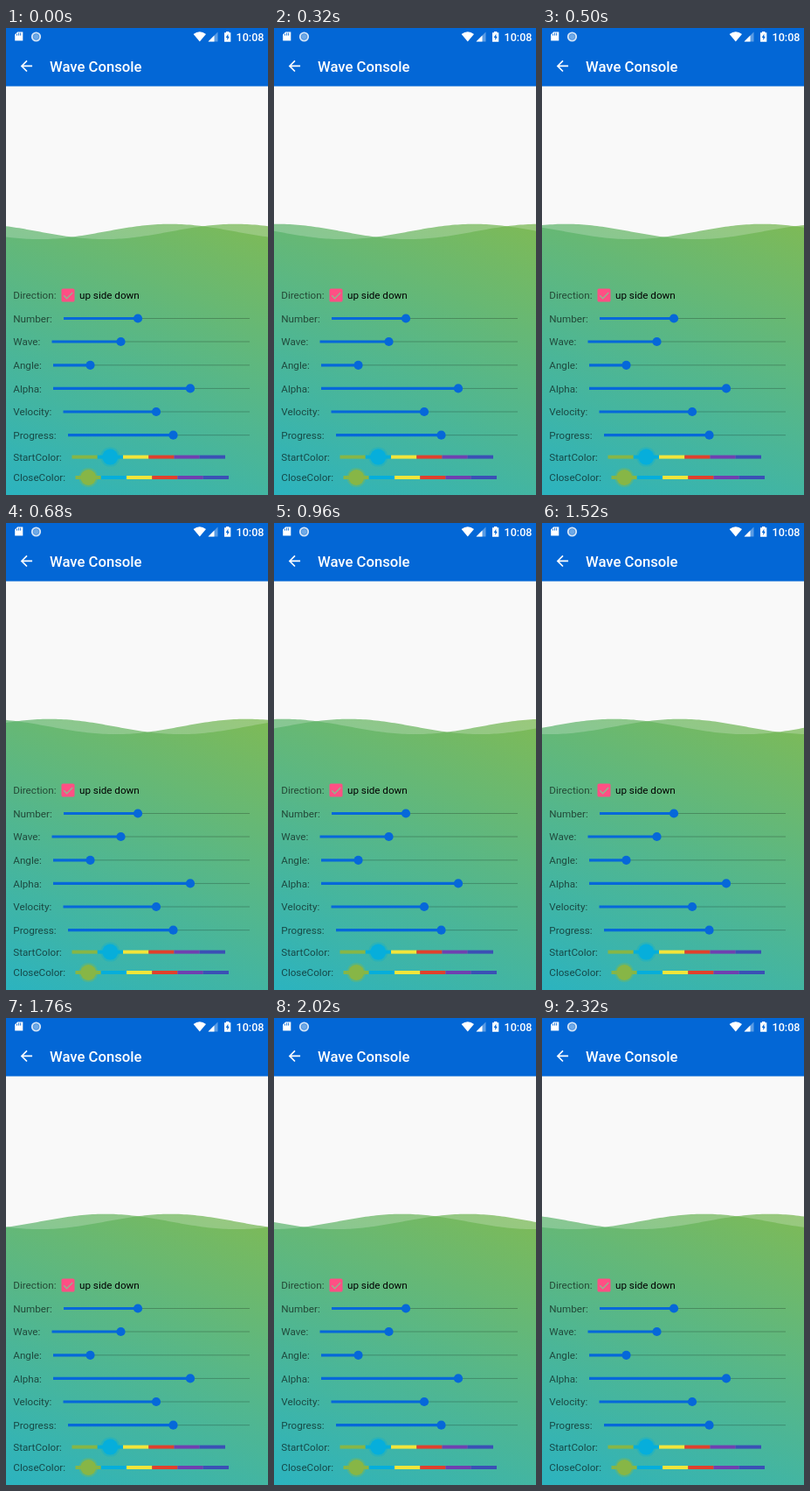
An HTML page that plays this animation: 300x533 px, repeating every 2340 ms.

```html
<!DOCTYPE html>
<html lang="en">
<head>
<meta charset="utf-8">
<title>Wave Console</title>
<style>
  html, body { margin: 0; width: 100%; height: 100%; overflow: hidden; background: #f9f9f9; }
  svg { display: block; width: 300px; height: 533px; }
  text { font: 11.67px Roboto, sans-serif; }
  .title { font-size: 16.67px; font-weight: 500; fill: #fff; }
  .clock { font-size: 12.6px; font-weight: 500; fill: #fff; }
  .label { fill: rgba(0, 0, 0, .6); }
</style>
</head>
<body>
<svg viewBox="0 0 300 533">
  <defs>
    <linearGradient id="water" gradientUnits="userSpaceOnUse" x1="69" y1="578" x2="231" y2="186">
      <stop offset="0" stop-color="#14acbe"/>
      <stop offset="1" stop-color="#74b444"/>
    </linearGradient>
  </defs>

  <g fill="url(#water)" fill-opacity=".7">
    <path class="wave"/>
    <path class="wave"/>
  </g>

  <rect width="300" height="66.5" fill="#0367d6"/>

  <!-- status bar -->
  <g fill="#fff">
    <path d="M13.2 4.5H19.3V14.6H10.2V7.5Z"/>
    <path d="M12.5 6.6v2M14.6 5.6v3M16.7 5.6v3" stroke="#0367d6" stroke-width=".9"/>
    <circle cx="34.5" cy="10" r="5.6" fill="#d5e5f7"/>
    <circle cx="34.5" cy="10" r="3.4" fill="#6fa9e6" stroke="#3f8bdc" stroke-width=".8"/>
    <path d="M214.6 7Q221.8 1.6 229 7L221.8 15.6Z"/>
    <path d="M242.5 4.5V15.5H231.5Z" opacity=".35"/>
    <path d="M238.5 8.5V15.5H231.5Z"/>
    <path d="M252 4H255.4V5.2H257.3V15.7H250V5.2H252Z"/>
    <path d="M254.3 6.8L251.7 10.9H253.3V14L255.8 9.8H254.3Z" fill="#0367d6"/>
  </g>
  <text class="clock" x="263.5" y="14.6">10:08</text>

  <!-- app bar -->
  <path transform="translate(13.4 33.4) scale(.833)" fill="#fff"
        d="M20 11H7.83l5.59-5.59L12 4l-8 8 8 8 1.41-1.41L7.83 13H20z"/>
  <text class="title" x="50" y="49.6">Wave Console</text>

  <!-- direction -->
  <text class="label" x="8.3" y="309.2">Direction:</text>
  <rect x="63.5" y="297.5" width="15" height="15" rx="1.6" fill="#ff4f84"/>
  <path d="M66.2 305.2l3.4 3.5 6.6-6.8" fill="none" stroke="#92b58e" stroke-width="1.5"/>
  <text x="84" y="309.2">up side down</text>

  <g id="controls"></g>
</svg>
<script>
const LOOP = 2340, STEP = 20, WIDTH = 300, LEVEL = 232.4, HEIGHT = 8.7;
const BLUE = '#0668d9';
const COLORS = ['#87b646', '#06aedb', '#f3e53a', '#e0402c', '#6f40b0', '#3b50b5'];

const line = (x1, x2, y, color, size) =>
  `<path d="M${x1} ${y}H${x2}" stroke="${color}" stroke-width="${size}"/>`;
const dot = (x, y, r, color, alpha = 1) =>
  `<circle cx="${x}" cy="${y}" r="${r}" fill="${color}" opacity="${alpha}"/>`;
const label = (name, y) => `<text class="label" x="8.3" y="${y + 4.2}">${name}:</text>`;

const slider = (name, y, start, thumb) =>
  label(name, y) +
  line(thumb, 279, y, 'rgba(0,0,0,.24)', 1) +
  line(start, thumb, y, BLUE, 3.2) +
  dot(thumb, y, 5.1, BLUE);

const palette = (name, y, start, thumb, pick) => {
  const size = 175.5 / COLORS.length;
  const bars = COLORS.map((c, i) => line(start + i * size, start + (i + 1) * size, y, c, 4));
  return label(name, y) + bars.join('') +
    dot(thumb, y, 11, COLORS[pick], .35) + dot(thumb, y, 9, COLORS[pick]);
};

document.getElementById('controls').innerHTML =
  slider('Number', 331.5, 66, 151) +
  slider('Wave', 358, 52.5, 131.5) +
  slider('Angle', 384.8, 54, 96.5) +
  slider('Alpha', 411.4, 54, 211) +
  slider('Velocity', 438, 65.5, 172) +
  slider('Progress', 464.7, 71, 191.5) +
  palette('StartColor', 489.6, 75.5, 119.3, 1) +
  palette('CloseColor', 513, 79.5, 94.3, 0);

const waves = document.querySelectorAll('.wave');

function wavePath(crest) {
  let d = 'M0 533';
  for (let x = 0; x <= WIDTH; x += 3) {
    const y = LEVEL - HEIGHT * Math.cos(2 * Math.PI * (x - crest) / WIDTH);
    d += `L${x} ${y.toFixed(2)}`;
  }
  return d + 'V533Z';
}

// Two equal waves a quarter period apart drift right, one screen per loop.
function draw() {
  const t = Math.floor(performance.now() % LOOP / STEP) * STEP;
  const crest = 188 + WIDTH * t / LOOP;
  waves.forEach((wave, i) => wave.setAttribute('d', wavePath(crest + i * WIDTH / 4)));
  requestAnimationFrame(draw);
}
draw();
</script>
</body>
</html>
```
